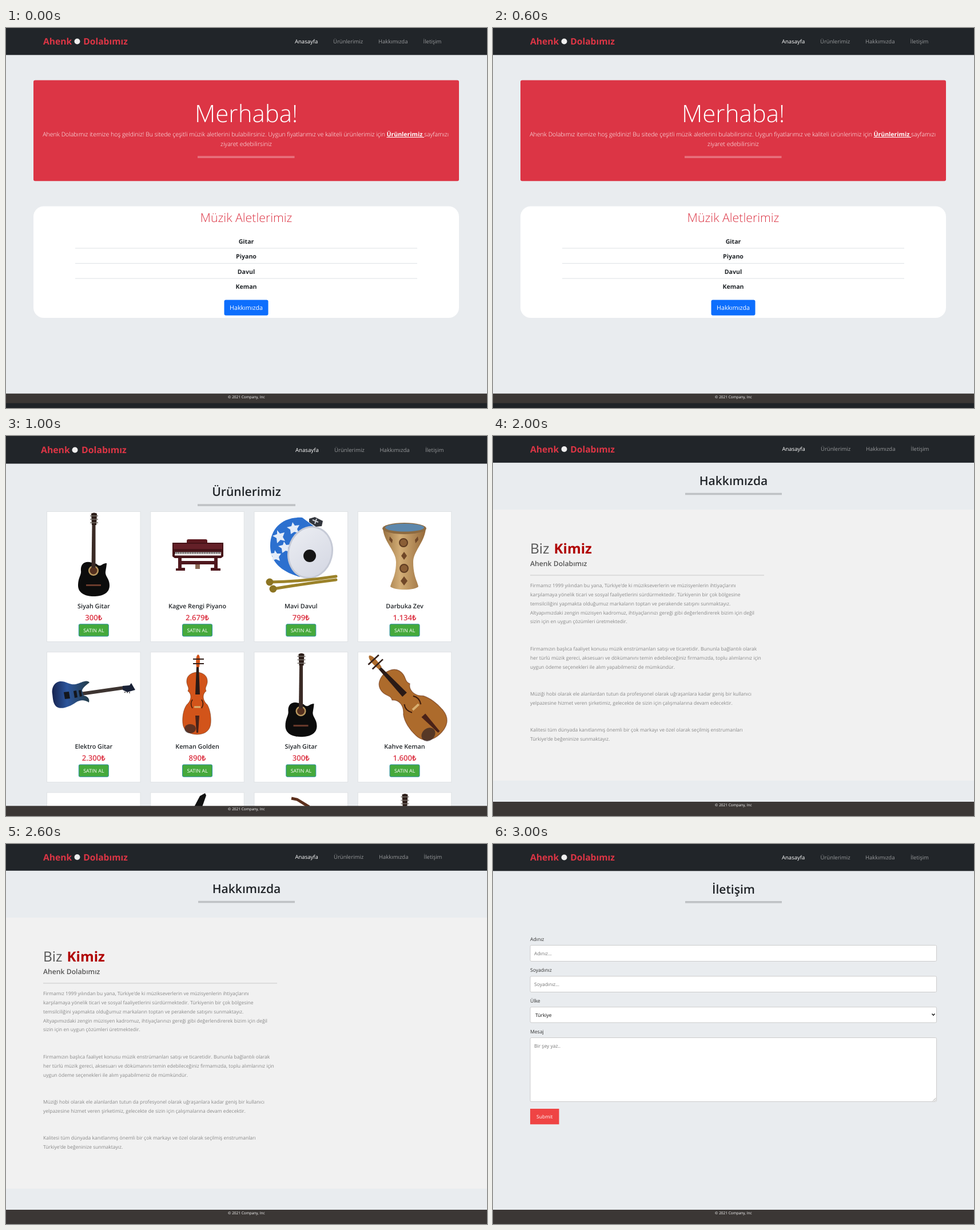
Write an HTML page that moves like this. It is 841x666 px and loops after 4000 ms.

```html
<!DOCTYPE html>
<html lang="tr">
<head>
<meta charset="utf-8">
<title>Ahenk Dolabımız</title>
<style>
html, body { margin: 0; width: 100%; height: 100%; overflow: hidden; background: #e9ecef; }
svg { display: block; }
text { font-family: "Open Sans", "Noto Sans", sans-serif; text-rendering: geometricPrecision; white-space: pre; }
</style>
</head>
<body>
<svg id="stage" width="841" height="666" viewBox="0 0 841 666">
<defs>
  <linearGradient id="blue"><stop stop-color="#16234f"/><stop offset=".4" stop-color="#2c559c"/><stop offset="1" stop-color="#233c48"/></linearGradient>
  <linearGradient id="tan"><stop stop-color="#98703f"/><stop offset=".4" stop-color="#d3ae77"/><stop offset="1" stop-color="#95693a"/></linearGradient>
  <linearGradient id="skin" x2="1" y2="1"><stop stop-color="#eceef3"/><stop offset="1" stop-color="#d3d6e2"/></linearGradient>
  <g id="guitar">
    <path d="M150 222C138 218 130 224 131 236C132 244 126 248 126 262C126 276 140 281 153 281C168 281 181 276 181 262C181 250 173 246 174 238C175 232 176 226 176 223C168 222 166 232 158 224Z" fill="#0c0c0c"/>
    <circle cx="153" cy="236" r="9" fill="#b9985f"/><circle cx="153" cy="236" r="6.500" fill="#54301f"/>
    <path d="M150.500 155h6v76h-7z" fill="#3a2a25"/>
    <path d="M149 136q5-3 10 0l-1 20h-8z" fill="#2c1d18"/>
    <path d="M147 140h14M147 146h14M147 152h14" stroke="#77706a" stroke-width="1.500"/>
    <path d="M140 260h26v3h-26z" fill="#6b3b2c"/>
  </g>
  <g id="piano">
    <rect x="316" y="181" width="36" height="14" rx="3" fill="#5c1a20"/>
    <path d="M291 187h89v24l-4 3h-81l-4-3z" fill="#451318"/>
    <path d="M293 189h85v9h-85z" fill="#642028"/>
    <path d="M295 203.500h81v6h-81z" fill="#f3eeee"/>
    <path d="M295 205h81" stroke="#222" stroke-width="3" stroke-dasharray="1.500 1.500"/>
    <path d="M301 214h6v17h6v5h-16v-4h4zM364 214h6v18h5v4h-17v-5h6zM307 219h57v6h-57z" fill="#4f171d"/>
    <path d="M331 225h8v8h-8z" fill="#8a6a55"/>
  </g>
  <g id="drum">
    <path d="M518 143C484 141 461 162 462 194C463 222 482 238 514 247L562 176Z" fill="#2c70cf"/>
    <path d="M474 165l5 6 8-2-3 8 4 7-8-2-6 6-1-9-7-4 8-3zM501 151l4 6 8-1-4 7 3 7-8-2-6 4-1-8-6-4 8-2zM486 185l4 6 8-1-5 6 3 7-7-2-6 4-1-8-6-4 8-2zM470 200l4 6 7 0-4 6 2 7-7-3-6 2 0-7-4-5 7-1z" fill="#e4ecf8"/>
    <ellipse cx="532" cy="204" rx="38" ry="45" transform="rotate(14 532 204)" fill="url(#skin)" stroke="#c6cad6" stroke-width="3"/>
    <circle cx="531" cy="210" r="11" fill="#151515"/>
    <path d="M530 145l10-3 14 7-2 9-10 1-12-8z" fill="#33363d"/>
    <path d="M536 147l10 4M543 145l-3 9" stroke="#c9ccd3" stroke-width="2"/>
    <path d="M461 256Q520 255 577 246M467 268Q520 259 577 252" fill="none" stroke="#9b8229" stroke-width="5" stroke-linecap="round"/>
    <circle cx="461" cy="256" r="6.500" fill="#8c7422"/><circle cx="467" cy="268" r="6.500" fill="#8c7422"/>
  </g>
  <g id="darbuka">
    <path d="M659 163C662 188 682 202 682 221C682 245 674 254 672 264C680 271 714 271 721 264C719 254 712 245 712 221C712 202 731 188 734 163Z" fill="url(#tan)"/>
    <ellipse cx="696.500" cy="162" rx="38.500" ry="10" fill="#8d6a40"/><ellipse cx="697" cy="160.500" rx="34" ry="7" fill="#5d87ab"/>
    <g fill="#8a5e36" stroke="#5f3c22" stroke-width="2"><circle cx="695" cy="187" r="7"/><circle cx="696" cy="232" r="7"/></g>
    <path d="M696 203l5 7-5 7-5-7zM696 246l6 8-6 8-6-8zM671 176l5 6-1 6-5-6zM720 176l-5 6 1 6 5-6z" fill="#704728"/>
  </g>
  <g id="electric">
    <path d="M130 449L207 438 208 444 132 455Z" fill="#3d3431"/>
    <path d="M204 438L216 437 219 433 226 445 212 449 204 445Z" fill="#1a2236"/>
    <path d="M207 449l12 1" stroke="#555" stroke-width="2" stroke-dasharray="2 2"/>
    <path d="M81 452C79 440 86 430 96 430C106 430 112 437 122 435C132 433 140 426 146 432C140 437 134 441 133 446L136 455C142 456 147 460 145 467C137 462 130 462 122 467C112 474 98 480 89 475C82 470 82 460 81 452Z" fill="url(#blue)"/>
    <path d="M101 449l9-1 2 12-9 1zM118 447l5-1 2 12-5 1zM127 446l4-1 2 11-4 1z" fill="#14161c"/>
  </g>
  <g id="violin">
    <path d="M334 414C322 415 315 421 316 432C317 439 321 441 318 447C325 452 325 463 316 471C311 478 308 490 309 503C310 517 321 523 334 523C347 523 357 517 358 503C359 490 356 478 352 471C343 463 343 452 350 447C347 441 351 439 352 432C353 421 346 415 334 414Z" stroke="#6b3216" stroke-opacity=".6"/>
    <path d="M326 462q-5 7 0 15M342 462q5 7 0 15" fill="none" stroke="#3a1a0c" stroke-width="1.500"/>
    <path d="M333 404h4l2 49h-8z" fill="#2a1a16"/>
    <path d="M333 405C331 390 333 384 336 383C339 384 340 392 338 405Z"/>
    <path d="M327 391h19M327 399h19" stroke="#33201a" stroke-width="2"/>
    <path d="M329 475h11" stroke="#d9b070" stroke-width="3"/>
    <path d="M331 490h7l-2 30h-3z" fill="#4a2218"/>
    <ellipse cx="322" cy="513" rx="10" ry="8" fill="#3a2724" opacity=".75"/>
  </g>
</defs>
</svg>
<script>
const RED = "#dc3545", DARK = "#212529", NAME = ["Ahenk", "Dolabımız"];
const stage = document.getElementById("stage");

const text = (x, y, size, str, fill = DARK, weight = 400, anchor = "start", extra = "") =>
  `<text x="${x}" y="${y}" font-size="${size}" fill="${fill}" font-weight="${weight}" text-anchor="${anchor}" ${extra}>${str}</text>`;
const mid = (x, y, size, str, fill, weight) => text(x, y, size, str, fill, weight, "middle");
const box = (x, y, x2, y2, fill, extra = "") =>
  `<rect x="${x}" y="${y}" width="${x2 - x}" height="${y2 - y}" fill="${fill}" ${extra}/>`;
const use = (id, transform = "", fill = "") => `<use href="#${id}" transform="${transform}" fill="${fill}"/>`;

function nav(height, x, y, size, links) {
  const gap = size * 4.5;
  return box(0, 0, 841, height, DARK) +
    text(x, y, size, NAME[0], RED, 700) +
    `<circle cx="${x + 59.5}" cy="${y - 5.5}" r="5" fill="#eee"/>` +
    text(x + gap, y, size, NAME[1], RED, 700) +
    ["Anasayfa", "Ürünlerimiz", "Hakkımızda", "İletişim"].map((s, i) =>
      text(links[i], y - 2.3, size * 0.61, s, i ? "#96989a" : "#fff")).join("");
}
const footer = y => box(0, y, 841, 666, "#3b3735") + mid(420.3, y + 8, 6.5, "© 2021 Company, Inc", "#fff");
const heading = (str, y, x, x2, barY) =>
  mid(420.5, y, 21.1, str, DARK, 600) + box(x, barY, x2, barY + 3.6, "#bfc2c5");

function home() {
  const list = ["Gitar", "Piyano", "Davul", "Keman"].map((s, i) =>
    mid(420, 377.5 + i * 26.5, 10.6, s, DARK, 700) +
    (i ? box(121, 359 + i * 26.5, 719, 360 + i * 26.5, "#dee2e6") : "")).join("");
  return nav(47.3, 65, 29, 15.6, [505, 572, 651, 729.5]) +
    box(48, 91.5, 792, 268.3, RED, 'rx="3"') +
    mid(420, 164.5, 42, "Merhaba!", "#fff", 300) +
    text(663, 190, 10.55, NAME.join(" ") + " itemize hoş geldiniz! Bu sitede çeşitli müzik aletlerini bulabilirsiniz. Uygun fiyatlarımız ve kaliteli ürünlerimiz için", "#fff", 300, "end") +
    text(665.5, 190, 10.55, "Ürünlerimiz ", "#fff", 700, "start", 'text-decoration="underline"') +
    text(731, 190, 10.55, "sayfamızı", "#fff", 300) +
    mid(420, 206.5, 10.55, "ziyaret edebilirsiniz", "#fff", 300) +
    box(335, 224.3, 504.5, 228, "#e7707c") +
    box(48, 312.5, 792, 508, "#fff", 'rx="18"') +
    mid(420, 340, 21.3, "Müzik Aletlerimiz", RED, 300) + list +
    box(381.5, 476.5, 458.5, 503.7, "#0d6efd", 'rx="3"') +
    mid(420, 494.3, 10.7, "Hakkımızda", "#fff") +
    footer(640.7) + box(0, 657.5, 841, 666, "#1f2327");
}

function products() {
  const items = [
    ["Siyah Gitar", "300"], ["Kagve Rengi Piyano", "2.679"], ["Mavi Davul", "799"], ["Darbuka Zev", "1.134"],
    ["Elektro Gitar", "2.300"], ["Keman Golden", "890"], ["Siyah Gitar", "300"], ["Kahve Keman", "1.600"],
    [], [], [], []];
  const cards = items.map(([name, price], i) => {
    const x = 71.5 + (i % 4) * 181.25, y = 132.5 + (i >> 2) * 246.2, c = x + 81.8;
    return box(x, y, x + 163.5, y + 228, "#fff", 'stroke="#dfe2e5"') + (name ?
      mid(c, y + 169.5, 10.8, name, DARK, 600) +
      mid(c, y + 190, 13.1, price + "₺", RED, 600) +
      box(c - 26, y + 197.3, c + 26, y + 218.5, "#45a93c", 'rx="2" stroke="#2b8fa5"') +
      mid(c, y + 211.3, 8.85, "SATIN AL", "#fff") : "");
  }).join("");
  return nav(48.5, 61, 30, 15.8, [506, 574, 653.5, 733]) +
    heading("Ürünlerimiz", 105, 335, 506, 119.3) + cards +
    use("guitar") + use("piano") + use("drum") + use("darbuka") + use("electric") +
    use("violin", "", "#d2541a") + use("guitar", "translate(362.5 246.2)") +
    use("violin", "translate(760 521) rotate(-43) scale(1.32) translate(-335 -523)", "#ad6b2c") +
    '<path d="M329 650L339 631 348 626 350 630 343 650Z" fill="#111"/>' +
    '<path d="M499 635l10 2 21 13" fill="none" stroke="#5b2f1c" stroke-width="5"/>' +
    use("guitar", "translate(543.5 492.5)") + footer(648.3);
}

function about() {
  const lines = [
    "Firmamız 1999 yılından bu yana, Türkiye'de ki müzikseverlerin ve müzisyenlerin ihtiyaçlarını",
    "karşılamaya yönelik ticari ve sosyal faaliyetlerini sürdürmektedir. Türkiyenin bir çok bölgesine",
    "temsilciliğini yapmakta olduğumuz markaların toptan ve perakende satışını sunmaktayız.",
    "Altyapımızdaki zengin müzisyen kadromuz, ihtiyaçlarınızı gereği gibi değerlendirerek bizim için değil",
    "sizin için en uygun çözümleri üretmektedir.", "", "",
    "Firmamızın başlıca faaliyet konusu müzik enstrümanları satışı ve ticaretidir. Bununla bağlantılı olarak",
    "her türlü müzik gereci, aksesuarı ve dökümanını temin edebileceğiniz firmamızda, toplu alımlarınız için",
    "uygun ödeme seçenekleri ile alım yapabilmeniz de mümkündür.", "", "",
    "Müziği hobi olarak ele alanlardan tutun da profesyonel olarak uğraşanlara kadar geniş bir kullanıcı",
    "yelpazesine hizmet veren şirketimiz, gelecekte de sizin için çalışmalarına devam edecektir.", "", "",
    "Kalitesi tüm dünyada kanıtlanmış önemli bir çok markayı ve özel olarak seçilmiş enstrumanları",
    "Türkiye'de beğeninize sunmaktayız."];
  return nav(46.8, 65, 28.5, 15.6, [505.5, 573, 652, 730.5]) +
    heading("Hakkımızda", 86, 336, 505, 99.7) +
    box(0, 129, 841, 604, "#f1f1f1") +
    text(65, 206, 24.5, "Biz", "#555") + text(106.5, 206, 24.2, "Kimiz", "#b00000", 700) +
    text(65, 228, 12.2, NAME.join(" "), "#555", 600) +
    box(65, 243.5, 474, 244.5, "#c8c8c8") +
    lines.map((s, i) => text(65, 265 + i * 15.84, 8.5, s, "#888")).join("") +
    footer(641);
}

function contact() {
  const field = (label, hint, y, y2, color = "#757575", x = 72) =>
    text(65, y - 7, 8.6, label, "#333") +
    box(65, y + .5, 775.5, y2, "#fff", 'rx="2" stroke="#ccc"') +
    text(x, y + 17.6, 8.5, hint, color);
  return nav(47.3, 65, 29, 15.6, [505, 572.5, 651, 730]) +
    heading("İletişim", 86.5, 336, 505, 100) +
    field("Adınız", "Adınız...", 177, 205.5) +
    field("Soyadınız", "Soyadınız...", 231.3, 259.5) +
    field("Ülke", "Türkiye", 285.3, 313, "#111", 74) +
    field("Mesaj", "Bir şey yaz..", 339, 451.5) +
    '<path d="M767.500 297.500l2.500 2.700 2.500-2.700" fill="none" stroke="#111" stroke-width="1.400"/>' +
    '<path d="M769 450.500l5.500-5.500M772 450.500l2.500-2.500" stroke="#888" stroke-width=".8"/>' +
    box(65, 464, 115.5, 491.3, "#ef4444") + mid(90.2, 481, 8.5, "Submit", "#fff") +
    footer(641);
}

stage.insertAdjacentHTML("beforeend",
  [home, products, about, contact].map(page => `<g class="page">${page()}</g>`).join(""));
const pages = document.querySelectorAll(".page");

function draw() {
  const current = Math.floor(performance.now() % 4000 / 1000);
  pages.forEach((page, i) => page.style.display = i === current ? "" : "none");
  requestAnimationFrame(draw);
}
draw();
</script>
</body>
</html>
```
